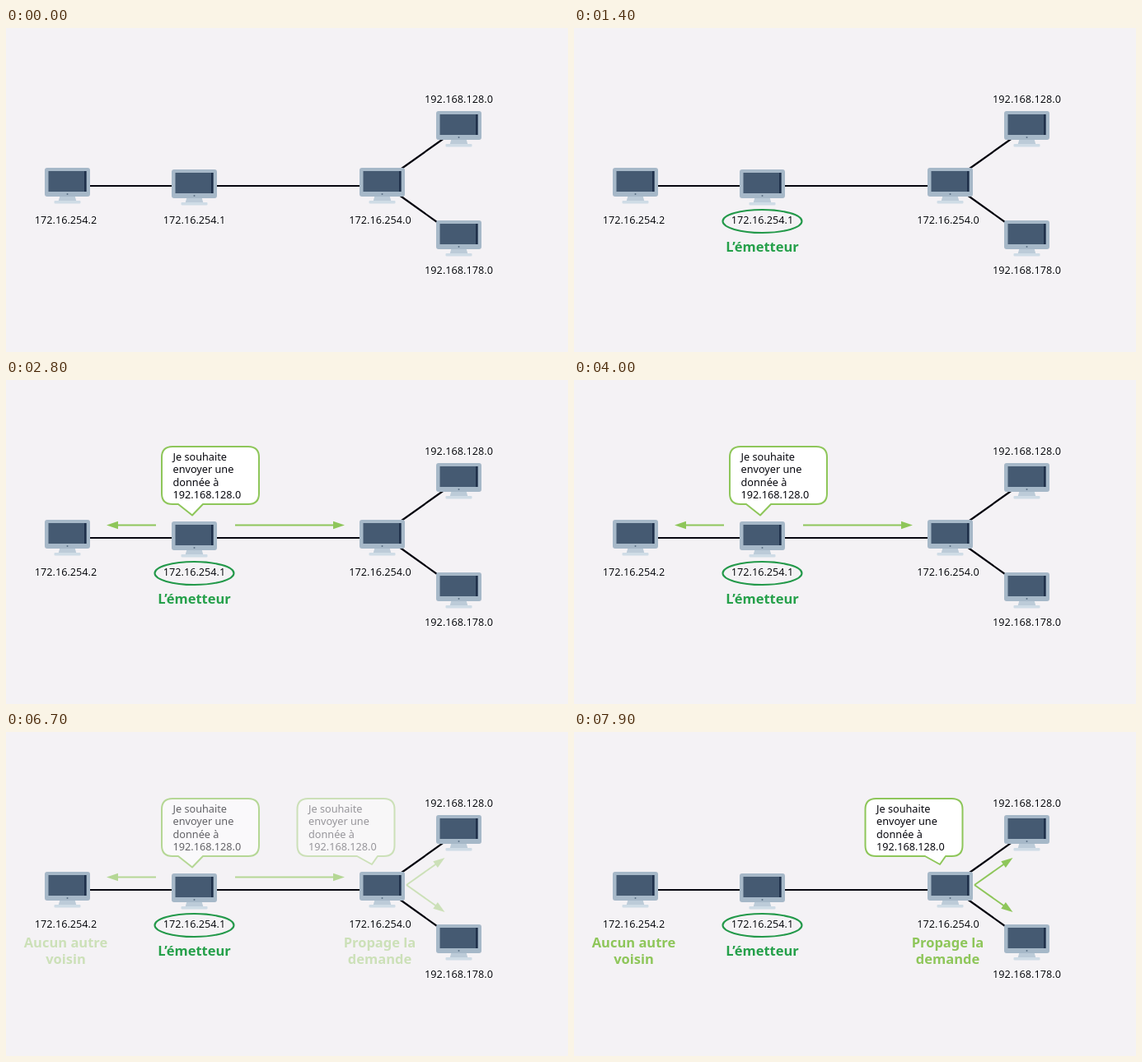
Recreate the animation shown at these times as an HTML page. Size 682 by 394 pixels, loop 8 s.

```html
<!DOCTYPE html>
<html lang="fr">
<head>
<meta charset="utf-8">
<title>Propagation dans un réseau</title>
<style>
  html, body { margin: 0; width: 100%; height: 100%; overflow: hidden; background: #f4f2f5; }
  svg { display: block; width: 682px; height: 394px; }
  text { font: 500 12.7px "Noto Sans", "Open Sans", sans-serif; fill: #08080f; }
  .address { text-anchor: middle; paint-order: stroke; stroke: #fff; stroke-width: 2; stroke-linejoin: round; }
  .label { font-size: 16.5px; font-weight: 700; text-anchor: middle; fill: #8ec65a; }
  .sender .label { fill: #25a04a; }
  .links { stroke: #06060f; stroke-width: 2.2; }
  .arrow { stroke: #8ec65a; stroke-width: 2; }
  .bubble { fill: #fff; stroke: #8ec65a; stroke-width: 2; stroke-linejoin: round; }
</style>
</head>
<body>
<svg viewBox="0 0 682 394">
  <defs>
    <g id="monitor">
      <path d="M-9 34H9L11 41H-11Z" fill="#bccbd8"/>
      <rect x="-16" y="40" width="32" height="3.5" rx="1" fill="#cfdce6"/>
      <rect x="-27.5" width="55" height="35" rx="3" fill="#a6b8c8"/>
      <rect x="-23" y="4" width="46" height="25" fill="#455a72"/>
      <rect x="20.5" y="4" width="2.5" height="25" fill="#1f304a"/>
      <circle cy="32" r="1" fill="#5c7086"/>
    </g>
    <path id="head" d="M0 0L-14 -4.8V4.8Z" fill="#8ec65a"/>
  </defs>

  <path class="links" d="M100 192H203M254 192H431M475 174.5L536 131M470 198L530 241"/>
  <g id="nodes"></g>

  <g id="sender" class="sender">
    <ellipse cx="228.5" cy="235" rx="48" ry="14" fill="none" stroke="#23994a" stroke-width="2.1"/>
    <text class="label" x="228.5" y="271.7">L’émetteur</text>
  </g>
  <g id="request"></g>
  <g id="relay">
    <text class="label" x="72.5" y="261.7">Aucun autre</text>
    <text class="label" x="72.5" y="281.7">voisin</text>
    <text class="label" x="453.5" y="261.7">Propage la</text>
    <text class="label" x="453.5" y="281.7">demande</text>
  </g>
</svg>
<script>
const byId = id => document.getElementById(id);
const add = (id, markup) => byId(id).insertAdjacentHTML('beforeend', markup);

// Monitor centre and top, then address centre and baseline
const nodes = [
  [74.5, 170, 72.5, 238, '172.16.254.2'],
  [228.5, 172, 228.5, 238, '172.16.254.1'],
  [456.5, 170, 454, 238, '172.16.254.0'],
  [549.5, 101, 549.5, 91, '192.168.128.0'],
  [549.5, 234, 549.5, 299, '192.168.178.0']
];
for (const [x, y, textX, textY, address] of nodes) {
  add('nodes', `<use href="#monitor" x="${x}" y="${y}"/>
    <text class="address" x="${textX}" y="${textY}">${address}</text>`);
}

function arrow(x1, y1, x2, y2) {
  const dx = x2 - x1, dy = y2 - y1;
  const k = 1 - 12 / Math.hypot(dx, dy);
  const angle = Math.atan2(dy, dx) * 180 / Math.PI;
  return `<line class="arrow" x1="${x1}" y1="${y1}" x2="${x1 + dx * k}" y2="${y1 + dy * k}"/>
    <use href="#head" transform="translate(${x2} ${y2}) rotate(${angle})"/>`;
}

function bubble(x, tailLeft, tipX, tipY, tailRight) {
  const lines = ['Je souhaite', 'envoyer une', 'donnée à', '192.168.128.0'];
  const text = lines.map((line, i) =>
    `<text x="${x + 13.5}" y="${98.3 + i * 15.1}">${line}</text>`).join('');
  return `<path class="bubble" d="M${x + 13} 81h92q13 0 13 13v44q0 13 -13 13H${tailRight}
    L${tipX} ${tipY}L${tailLeft} 151H${x + 13}q-13 0 -13 -13v-44q0 -13 13 -13z"/>${text}`;
}

add('request', bubble(189, 209, 226, 164.5, 239)
  + arrow(182, 176.5, 122, 176.5) + arrow(278, 176.5, 411, 176.5));
add('relay', bubble(353.5, 426, 444, 161, 451)
  + arrow(486, 186, 532.5, 153) + arrow(486, 186, 532.5, 219));

const LOOP = 8000, STEP = 100, FADE = 900;
const fade = (time, start) => Math.min(1, Math.max(0, (time - start) / FADE));

function draw(now) {
  const time = Math.floor(now % LOOP / STEP) * STEP;
  const relay = fade(time, 6350);
  byId('sender').style.opacity = fade(time, 450);
  byId('request').style.opacity = fade(time, 1500) * (1 - relay);
  byId('relay').style.opacity = relay;
}

let start;
function tick(now) {
  start ??= now;
  draw(now - start);
  requestAnimationFrame(tick);
}
draw(0);
requestAnimationFrame(tick);
</script>
</body>
</html>
```
